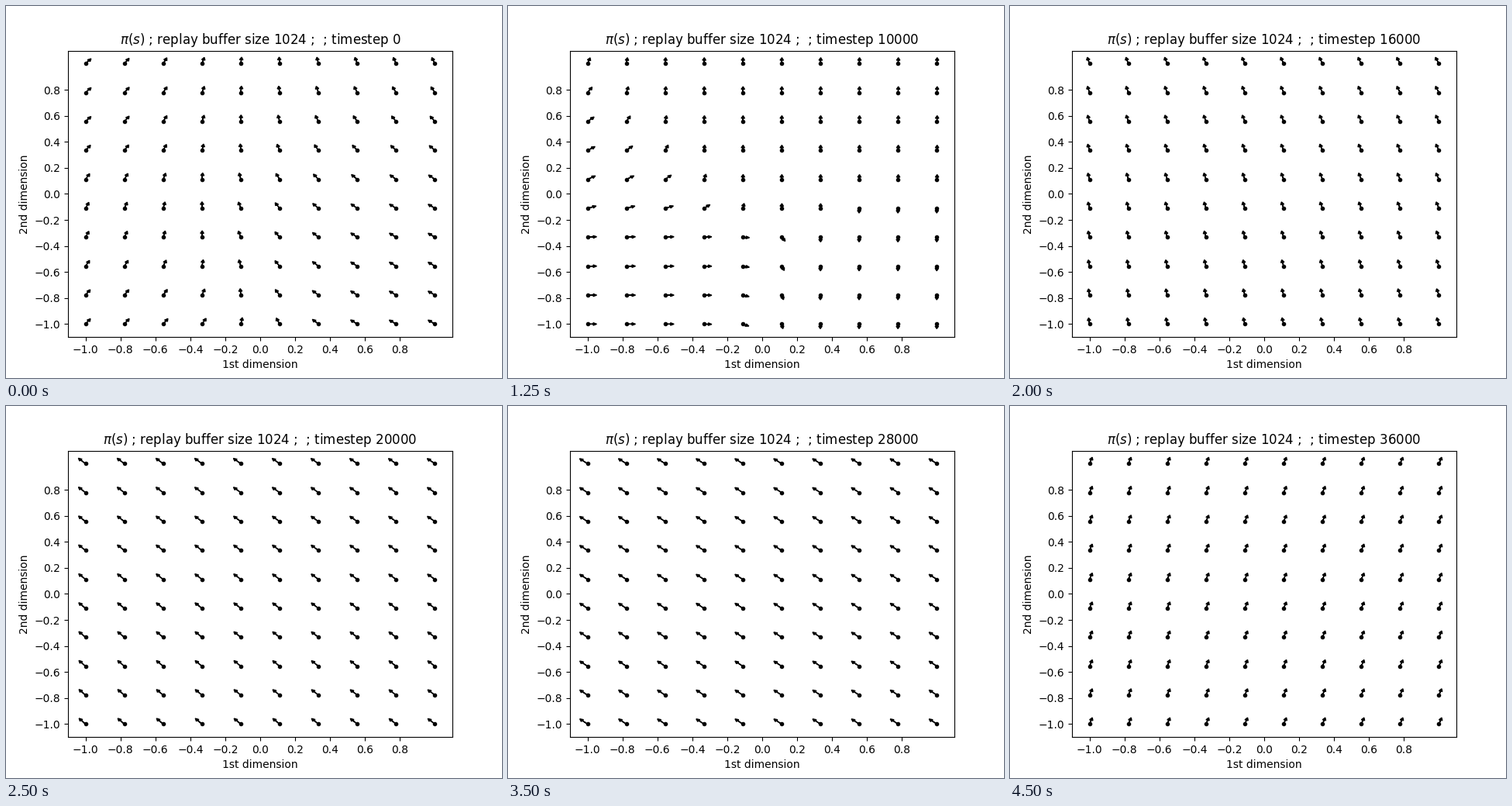
A matplotlib script for the animation above (4750 ms loop, 640x480 px).

```python
import numpy as np
import matplotlib.pyplot as plt
from matplotlib.animation import FuncAnimation

FRAMES, INTERVAL = 19, 250
STEP = 2000
GRID = np.linspace(-1, 1, 10)
X, Y = np.meshgrid(GRID, GRID)

# Heading of the nearly uniform late field at a few moments.
KEY_TIMES = [6, 7, 8, 9, 10, 12, 14, 15, 16, 17, 18]
KEY_ANGLES = [67, 76, 104, 128, 134, 136, 139, 130, 92, 45, 72]


def sigmoid(t):
    return 1 / (1 + np.exp(-np.clip(t, -50, 50)))


def vectors(angle, length):
    rad = np.radians(angle)
    return length * np.cos(rad), length * np.sin(rad)


def sweep(left, right, centre, width):
    """Value that turns from left to right across x."""
    return left + (right - left) * sigmoid((X - centre) / width)


def start_field():
    bump = np.exp(-((Y + 0.2) / 0.5) ** 2)
    left = 46 - 8 * Y + 18 * bump
    right = 142 - 28 * np.clip(Y, 0, 1)
    angle = sweep(left, right, -0.14 - 0.16 * Y**3, 0.28 + 0.14 * Y)
    return vectors(angle, 0.030)


def split_field():
    left = -52 * sigmoid((Y + 0.33) / 0.12)
    right = -123 - 33 * sigmoid(-(Y + 0.55) / 0.18)
    centre = -0.15 + 0.7 * np.maximum(-0.35 - Y, 0) + 0.1 * np.maximum(Y, 0)
    angle = sweep(left, right, centre, 0.045 + 0.35 * np.clip(Y + 0.2, 0, 1))
    longest = 0.021 + 0.021 * sigmoid(-(Y + 0.55) / 0.15)
    return vectors(angle, sweep(longest, 0.016, centre - 0.15, 0.07))


def fan_field():
    left = 33 * sigmoid((Y + 0.15) / 0.1)
    right = np.where(Y > 0.3 * (X - 0.8), 88, -92)
    centre = np.where(Y > -0.2, -0.35 - 0.8 * Y, 0.12 + 0.15 * Y)
    angle = sweep(left, right, centre, 0.08 + 0.1 * np.clip(Y, 0, 1))
    shortest = 0.016 + 0.010 * sigmoid((Y - 0.35) / 0.1)
    return vectors(angle, sweep(0.033, shortest, np.minimum(centre, -0.33), 0.12))


def uniform_field(i):
    spread = 8 * np.exp((6 - i) / 3)
    angle = np.interp(i, KEY_TIMES, KEY_ANGLES) + spread * (X + Y)
    length = 0.026 + 0.018 * np.abs(np.cos(np.radians(angle)))
    return vectors(angle, length)


def field(i):
    if i == 0:
        return start_field()
    if i == 1:
        return np.mean([start_field(), split_field()], axis=0)
    if i == 2:
        return split_field()
    if i == 3:
        return vectors(-30 - 15 * X - 5 * Y, 0.030)
    if i == 4:
        return vectors(-8 - 12 * X + 28 * Y, 0.030)
    if i == 5:
        return fan_field()
    return uniform_field(i)


plt.rcParams["text.kerning_factor"] = 6
fig, ax = plt.subplots(figsize=(6.4, 4.8), dpi=100)
ax.plot(X.ravel(), Y.ravel(), "k.")
arrows = [
    ax.arrow(x, y, 0.01, 0.01, head_width=0.02, head_length=0.02, color="k")
    for x, y in zip(X.ravel(), Y.ravel())
]
ax.set(xlim=(-1.1, 1.1), ylim=(-1.1, 1.1),
       xlabel="1st dimension", ylabel="2nd dimension")
ticks = np.round(np.arange(-1, 0.9, 0.2), 1) + 0.0
ax.set_xticks(ticks)
ax.set_yticks(ticks)
title = ax.set_title("")


def update(i):
    u, v = field(i)
    for arrow, dx, dy in zip(arrows, u.ravel(), v.ravel()):
        arrow.set_data(dx=dx, dy=dy)
    title.set_text(
        rf"$\pi(s)$ ; replay buffer size 1024 ;  ; timestep {i * STEP}")
    return [*arrows, title]


anim = FuncAnimation(fig, update, frames=FRAMES, interval=INTERVAL,
                     repeat=True, repeat_delay=0, blit=False)
plt.show()
```
